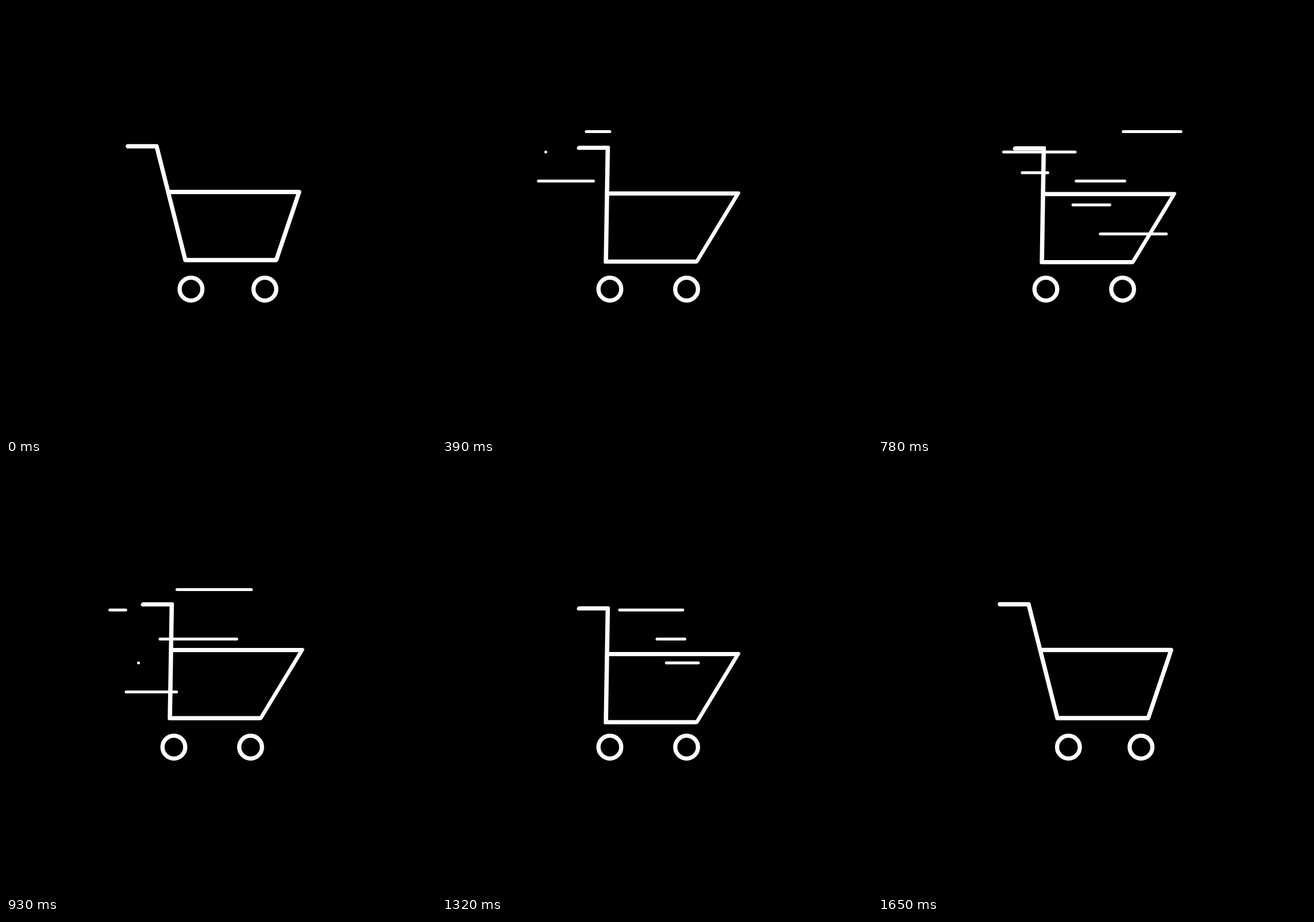
An HTML page that plays this animation: 748 px wide and 748 px high, repeating every 2700 ms.

```html
<!DOCTYPE html>
<html lang="en">
<head>
<meta charset="utf-8">
<title>Rolling cart</title>
<style>
  html, body { margin: 0; width: 100%; height: 100%; overflow: hidden; background: #000; }
  svg { display: block; width: 100vw; height: 100vh; }
  path, circle { fill: none; stroke: #fff; stroke-width: 7.3; stroke-linecap: round; stroke-linejoin: round; }
  #streaks path { stroke-width: 5; }
</style>
</head>
<body>
<svg viewBox="0 0 748 748">
  <path id="cart" d="M212 244H262L312 442H470L510 323.5H284"/>
  <circle id="rear" cy="492.5" r="19.8"/>
  <circle id="front" cy="492.5" r="19.8"/>
  <g id="streaks"></g>
</svg>
<script>
const LOOP = 2700, STEP = 30;
const $ = id => document.getElementById(id);
const mix = (a, b, u) => a + (b - a) * u;
const ramp = (t, start, span) => Math.min(1, Math.max(0, (t - start) / span));
const smooth = u => u * u * (3 - 2 * u);

// Each streak flies right to left; lead and lag ease its head and tail.
const lanes = [
  { y: 218.5, right: 545, left: 248, span: 390, lead: 1.8, lag: 2, starts: [30, 684] },
  { y: 254, right: 485, left: 180.5, span: 360, lead: 3, lag: 1.1, starts: [30, 600, 1230] },
  { y: 290, right: 395, left: 230, span: 210, lead: 1.65, lag: 1.5, starts: [30, 630] },
  { y: 304.5, right: 415, left: 145.5, span: 440, lead: 1.8, lag: 2, starts: [60] },
  { y: 304.5, right: 430.5, left: 154.5, span: 510, lead: 0.85, lag: 5.2, starts: [599] },
  { y: 304.5, right: 430.5, left: 145.5, span: 380, lead: 1.5, lag: 1.8, starts: [1268] },
  { y: 346, right: 480, left: 230.5, span: 300, lead: 1.2, lag: 1.7, starts: [30, 630, 1227] },
  { y: 396.5, right: 545, left: 154.5, span: 330, lead: 1.2, lag: 2.1, starts: [30, 664] }
];

const streaks = lanes.flatMap(lane => lane.starts.map(start => {
  const el = document.createElementNS("http://www.w3.org/2000/svg", "path");
  $("streaks").append(el);
  return { ...lane, start, el };
}));

function drawStreak({ el, y, right, left, span, lead, lag, start }, t) {
  const on = t > start && t <= start + span;
  el.style.display = on ? "" : "none";
  if (!on) return;
  const u = ramp(t, start, span);
  const head = mix(left, right, (1 - u) ** lead);
  const tail = mix(right, left, u ** lag);
  el.setAttribute("d", `M${head} ${y}H${tail}`);
}

function drawCart(t, back) {
  const skew = 0.269 * (smooth(ramp(t, 0, 330)) - back);
  const bob = t > 240 && t < 1650 ? 3.6 * (1 - Math.cos((t - 240) / 360 * Math.PI)) : 0;
  $("cart").setAttribute("transform", `matrix(1 0 ${-skew} 1 ${skew * 342} ${bob})`);
}

function drawWheel(id, from, to, rest, t, back) {
  const x = mix(from, to, ramp(t, 0, 330));
  $(id).setAttribute("cx", mix(x, rest, back));
}

function draw(now) {
  const t = Math.floor(now % LOOP / STEP) * STEP;
  const back = smooth(ramp(t, 1350, 300));
  drawCart(t, back);
  drawWheel("rear", 321.8, 292, 331.3, t, back);
  drawWheel("front", 450.3, 425.5, 457.5, t, back);
  streaks.forEach(s => drawStreak(s, t));
}

const begin = performance.now();
function tick() {
  draw(performance.now() - begin);
  requestAnimationFrame(tick);
}
tick();
</script>
</body>
</html>
```
